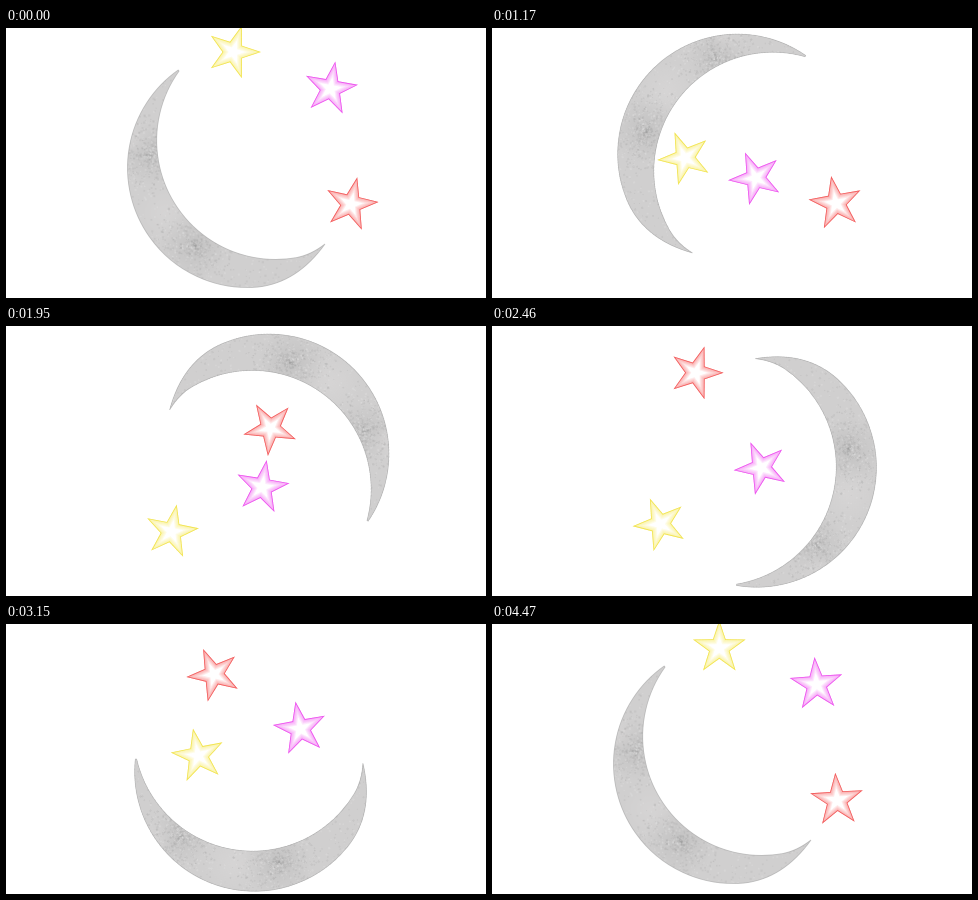
Animation, 480 px wide and 270 px high, one loop 4500 ms. Source, as an HTML page with a canvas:

```html
<!DOCTYPE html>
<html lang="en">
<head>
<meta charset="utf-8">
<title>Moon and stars</title>
<style>
  html, body { margin: 0; width: 100%; height: 100%; overflow: hidden; background: #fff; }
  canvas { display: block; width: 480px; height: 270px; }
</style>
</head>
<body>
<canvas id="stage" width="480" height="270"></canvas>
<script>
const LOOP = 4500, STEP = 30, RAD = Math.PI / 180;
const ctx = document.getElementById('stage').getContext('2d');
const smooth = u => u * u * (3 - 2 * u);
const clamp = u => Math.min(1, Math.max(0, u));

// Eased 0..1 with the bezier handles (x1, 0) and (x2, 1).
function bezierEase(x, x1, x2) {
  let lo = 0, hi = 1;
  for (let i = 0; i < 24; i++) {
    const s = (lo + hi) / 2, r = 1 - s;
    if (3 * r * r * s * x1 + 3 * r * s * s * x2 + s * s * s < x) lo = s; else hi = s;
  }
  return smooth(lo);
}

function seeded(seed) {
  return () => (seed = (seed * 16807) % 2147483647) / 2147483647;
}

// ---- Moon ----
const PIVOT = { x: 253.3, y: 135.8 };
const MOON_TIME = 3780;

function moonPath() {
  const p = new Path2D();
  const ox = 241.2, oy = 139.8, ix = 269.6, iy = 112.5;
  p.moveTo(173, 43);
  p.arc(ox, oy, 119.7, Math.atan2(43 - oy, 173 - ox), 85 * RAD, true);
  p.quadraticCurveTo(291, 255, 319, 216);
  p.quadraticCurveTo(305, 227, 290.2, 229.6);
  p.arc(ix, iy, 118.9, 80 * RAD, Math.atan2(43 - iy, 173 - ix));
  p.closePath();
  return p;
}

function paintMoon() {
  const scale = 2, layer = document.createElement('canvas');
  layer.width = 480 * scale;
  layer.height = 270 * scale;
  const c = layer.getContext('2d'), path = moonPath(), rand = seeded(77);
  c.scale(scale, scale);
  c.save();
  c.clip(path);
  c.fillStyle = '#d0cfcf';
  c.fillRect(0, 0, 480, 270);

  const blot = (x, y, r, rgb, alpha) => {
    const g = c.createRadialGradient(x, y, 0, x, y, r);
    g.addColorStop(0, `rgba(${rgb},${alpha})`);
    g.addColorStop(1, `rgba(${rgb},0)`);
    c.fillStyle = g;
    c.fillRect(x - r, y - r, 2 * r, 2 * r);
  };
  const dark = [[144, 126, 30], [188, 217, 34]];
  for (const [x, y, r] of dark) blot(x, y, r, '165,165,165', 0.3);
  blot(127, 110, 18, '222,220,220', 0.4);
  blot(158, 185, 30, '222,220,220', 0.4);

  for (let i = 0; i < 2600; i++) {
    const spot = dark[i % 2], near = rand() < 0.4;
    const a = rand() * 2 * Math.PI, d = rand() * spot[2] * 1.2;
    const x = near ? spot[0] + d * Math.cos(a) : 115 + rand() * 210;
    const y = near ? spot[1] + d * Math.sin(a) : 40 + rand() * 225;
    c.fillStyle = rand() < 0.6 ? 'rgba(140,140,140,.14)' : 'rgba(235,235,235,.18)';
    const size = 0.8 + rand() * 1.4;
    c.fillRect(x, y, size, size);
  }
  c.restore();
  c.strokeStyle = 'rgba(168,168,168,.7)';
  c.lineWidth = 0.8;
  c.lineJoin = 'bevel';
  c.stroke(path);
  return layer;
}

const moon = paintMoon();

function drawMoon(t) {
  ctx.save();
  ctx.translate(PIVOT.x, PIVOT.y);
  ctx.rotate(2 * Math.PI * bezierEase(clamp(t / MOON_TIME), 0.333, 0.824));
  ctx.drawImage(moon, -PIVOT.x, -PIVOT.y, 480, 270);
  ctx.restore();
}

// ---- Stars ----
const SPIN_TIMES = [0, 1170, 1950, 2460, 3150, 3810, 4470];
// out / back: start and end times of the trip away from home and the return.
const stars = [
  { rgb: '238,222,48', home: [227.3, 24], bend: [199.5, 116], far: [164, 209.5],
    out: [0, 2130], back: [2110, 4450], spin: [18, 266, 443, 554, 709, 866, 1008] },
  { rgb: '232,50,236', home: [324.5, 60.7], bend: [288, 113.7], far: [252.5, 166.6],
    out: [0, 1560], back: [1560, 4420], spin: [10, 265.5, 441.5, 553, 710, 872.5, 1004] },
  { rgb: '240,62,62', home: [345, 176.3], bend: [268, 105.7], far: [191, 35],
    out: [1090, 2757], back: [2820, 4420], spin: [13, 278, 473, 594, 769, 936.5, 1076.5] }
];

const starShape = new Path2D();
for (let i = 0; i < 10; i++) {
  const r = i % 2 ? 10.8 : 27.7, a = i * 36 * RAD;
  starShape.lineTo(r * Math.sin(a), -r * Math.cos(a));
}
starShape.closePath();

function spinAt(spin, t) {
  let i = 0;
  while (i < spin.length - 2 && t > SPIN_TIMES[i + 1]) i++;
  const u = (t - SPIN_TIMES[i]) / (SPIN_TIMES[i + 1] - SPIN_TIMES[i]);
  return spin[i] + u * (spin[i + 1] - spin[i]);
}

function drawStar(star, t) {
  const leg = ([from, to]) => smooth(clamp((t - from) / (to - from)));
  const k = Math.min(leg(star.out), 1 - leg(star.back)), r = 1 - k;
  const at = n => r * r * star.home[n] + 2 * r * k * star.bend[n] + k * k * star.far[n];
  ctx.save();
  ctx.translate(at(0), at(1));
  ctx.rotate(spinAt(star.spin, t) * RAD);
  ctx.fillStyle = '#fff';
  ctx.fill(starShape);
  ctx.clip(starShape);
  // Soft glow from the edge inwards.
  ctx.strokeStyle = `rgba(${star.rgb},.1)`;
  for (let w = 2; w <= 10; w += 2) {
    ctx.lineWidth = w;
    ctx.stroke(starShape);
  }
  ctx.strokeStyle = `rgba(${star.rgb},.7)`;
  ctx.lineWidth = 1.6;
  ctx.stroke(starShape);
  ctx.restore();
}

function draw(now) {
  const t = Math.floor((now % LOOP) / STEP) * STEP;
  ctx.fillStyle = '#fff';
  ctx.fillRect(0, 0, 480, 270);
  drawMoon(t);
  for (const star of stars) drawStar(star, t);
}

let start;
function tick(now) {
  start ??= now;
  draw(Math.max(0, now - start));
  requestAnimationFrame(tick);
}
draw(0);
requestAnimationFrame(tick);
</script>
</body>
</html>
```
